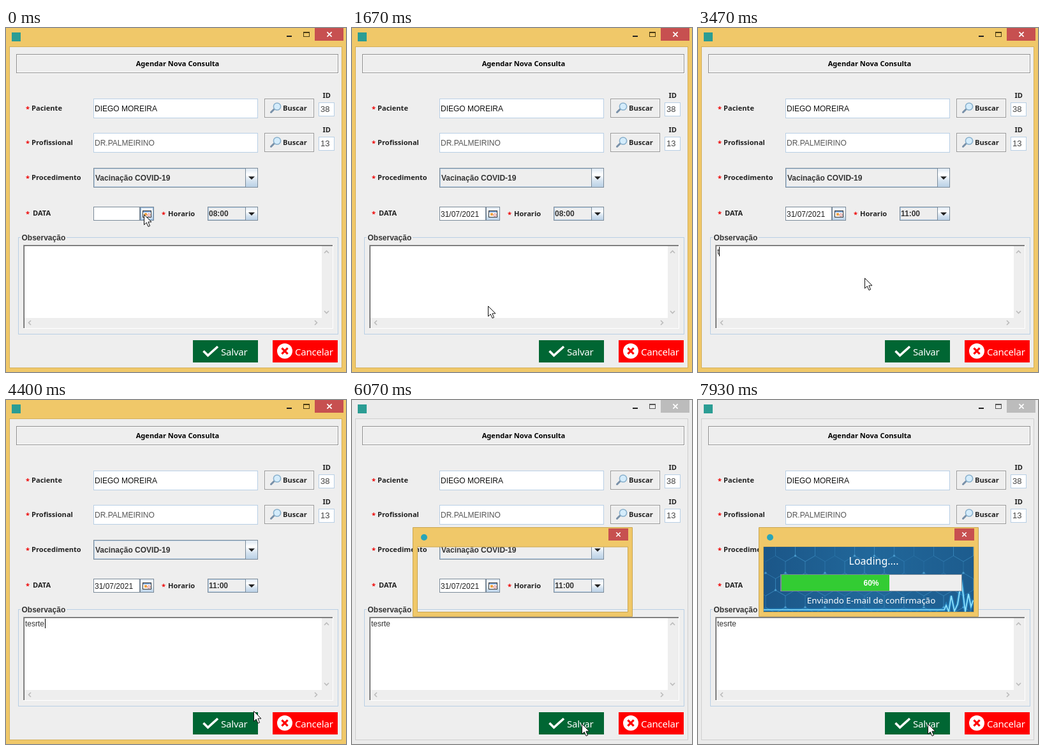
Animation, 533 px wide and 541 px high, one loop 8 s. Source, as an HTML page:

```html
<!DOCTYPE html>
<html lang="pt">
<head>
<meta charset="utf-8">
<style>
html, body { margin: 0; width: 533px; height: 541px; overflow: hidden }
svg { display: block; --frame: #f0c869; --edge: #d3b05c; --close: #c75050; --ink: #4a3b12 }
svg.idle { --frame: #ebebeb; --edge: #cfcfcf; --close: #bcbcbc; --ink: #555 }
text { font: 12px "Liberation Sans", Arial, sans-serif; white-space: pre }
.b { font-weight: bold; fill: #333 }
.l { font: bold 11.1px "Noto Sans", sans-serif; fill: #222 }
.n { font-family: "Noto Sans", sans-serif; fill: #fff }
rect { shape-rendering: crispEdges }
</style>
</head>
<body>
<svg id="stage" width="533" height="541" viewBox="0 0 533 541"></svg>
<script>
const STEEL = '#7a8a99', SKY = '#b8cfe5', PANEL = '#eee';

const fillBox = (x, y, w, h, fill, extra = '') =>
  `<rect x="${x}" y="${y}" width="${w}" height="${h}" fill="${fill}" ${extra}/>`;
const box = (x, y, w, h, fill, stroke) =>
  fillBox(x + .5, y + .5, w - 1, h - 1, fill, `stroke="${stroke}"`);
const line = (d, color, width = 1, extra = '') =>
  `<path d="${d}" fill="none" stroke="${color}" stroke-width="${width}" ${extra}/>`;
const shape = (d, fill) => `<path d="${d}" fill="${fill}"/>`;
const dot = (x, y, r, fill, extra = '') => `<circle cx="${x}" cy="${y}" r="${r}" fill="${fill}" ${extra}/>`;
const text = (x, y, s, cls = '', extra = '') => `<text x="${x}" y="${y}" class="${cls}" ${extra}>${s}</text>`;
const mid = 'text-anchor="middle"';
const group = (id, body) => `<g id="${id}">${body}</g>`;
const cross = (x, y, r, color, width) =>
  line(`M${x - r} ${y - r}l${2 * r} ${2 * r}m0 ${-2 * r}l${-2 * r} ${2 * r}`, color, width);
const label = (x, y, s, star) =>
  text(star, y + 1, '*', 'l', 'style="fill:#e00"') + text(x, y, s, 'l');
const triangle = (x, y, w, dir = 1) => shape(`M${x - w} ${y}h${2 * w}l${-w} ${w * dir}z`, '#222');

const combo = (x, y, w, h) =>
  box(x, y, w, h, PANEL, STEEL) + box(x + 1, y + 1, w - 2, h - 2, 'none', SKY) +
  box(x + w - 20, y, 20, h, 'url(#metal)', STEEL) + triangle(x + w - 10, y + h / 2 - 2, 5);

const search = y =>
  box(405, y, 78, 30, PANEL, '#999') + box(406, y + 1, 76, 28, 'none', '#f8f8f8') +
  line(`M420 ${y + 17}l-4.5 4.5`, '#7890a8', 3, 'stroke-linecap="round"') +
  dot(425, y + 12.5, 5.6, '#d4ecfb', 'stroke="#86aecb" stroke-width="1.5"') +
  text(434, y + 19, 'Buscar', 'l');

const person = (y, name, value, id, ink) =>
  box(137, y, 258, 31, '#fff', SKY) + text(139, y + 20, value, '', `fill="${ink}"`) +
  search(y) + box(490, y + 6, 25, 22, '#fff', SKY) +
  text(493, y + 21, id, '', 'style="font-size:13px" fill="#444"') +
  text(496.5, y - 1, 'ID', 'l') + label(40, y + 19, name, 31);

function windowFrame() {
  return fillBox(0, 0, 533, 541, 'var(--frame)') + box(5, 29, 522, 506, PANEL, 'var(--edge)') +
    fillBox(9, 7, 14, 14, '#2b9d94') +
    fillBox(440, 12, 8, 2, '#222') +
    fillBox(466.5, 7.5, 9, 6, 'none', 'stroke="var(--ink)"') + fillBox(466, 6, 10, 2, 'var(--ink)') +
    fillBox(484, 0, 45, 20, 'var(--close)') + cross(507, 10, 3.6, '#fff', 1.7);
}

function form() {
  return box(17, 42, 505, 30, 'none', '#fff') + box(16, 41, 505, 30, PANEL, '#8e8e8e') +
    box(17, 42, 503, 28, 'none', '#fafafa') +
    text(269, 60, 'Agendar Nova Consulta', 'l', mid + ' style="fill:#000"') +
    person(111, 'Paciente', 'DIEGO MOREIRA', '38', '#111') +
    person(165, 'Profissional', 'DR.PALMEIRINO', '13', '#555') +
    label(40, 239, 'Procedimento', 31) + combo(137, 220, 258, 31) + text(140, 240, 'Vacinação COVID-19', 'b') +
    label(42, 295, 'DATA', 31) + box(137, 281, 73, 22, '#fff', STEEL) + text(139, 297, '', '', 'id="date" fill="#222"') +
    box(210, 281, 22, 22, 'url(#metal)', STEEL) + group('hover', box(211, 282, 20, 20, 'none', '#8fb2d6')) +
    box(214, 287, 14, 11, '#fff', '#333') + fillBox(215, 288, 12, 2, '#7ba6d8') +
    fillBox(217, 291, 4, 4, '#f0a040') + dot(224, 294, 2, '#fff', 'stroke="#c66"') +
    label(254, 296, 'Horario', 244) + combo(316, 281, 79, 22) + text(318, 296, '', 'b', 'id="hour"') +
    box(19, 329, 502, 153, 'none', SKY) + fillBox(23, 324, 72, 12, PANEL) + text(24.5, 334, 'Observação', 'b');
}

function notes() {
  const chevron = d => line(d, '#bbb', 1.6);
  return fillBox(27, 341, 486, 132, '#fff') + fillBox(27, 341, 485, 131, '#9a9a9a') +
    fillBox(28, 342, 484, 130, '#666') + fillBox(29, 343, 483, 129, PANEL) + fillBox(29, 343, 466, 113, '#fff') +
    chevron('M499 354l3.5 -3.5 3.5 3.5') + chevron('M499 445l3.5 3.5 3.5 -3.5') +
    chevron('M39 460l-3.5 3.5 3.5 3.5') + chevron('M484 460l3.5 3.5 -3.5 3.5') +
    text(30, 356, '', '', 'id="note" fill="#333"') + fillBox(0, 344, 1, 15, '#000', 'id="caret"');
}

function actions() {
  const tight = 'style="font-size:15px;letter-spacing:-.2px"';
  return fillBox(293, 491, 102, 35, '#063') + line('M309.5 508l7 7 15.5 -14', '#fff', 3.6) +
    text(337, 515, 'Salvar', 'n', tight) +
    fillBox(418, 491, 102, 35, '#f00') + dot(437, 508, 12, '#fff') + cross(437, 508, 4.6, '#f00', 3.2) +
    text(453, 515, 'Cancelar', 'n', tight);
}

function calendar() {
  const cell = (c, r, s, color) => text(42.5 + c * 25, 361 + r * 21, s, 'b', `${mid} style="fill:${color};font-size:11px"`);
  let out = box(30, 303, 202, 172, PANEL, STEEL) + combo(31, 304, 104, 21) + text(35, 319, 'Julho', 'b') +
    box(135, 304, 17, 21, 'url(#metal)', STEEL) + triangle(143.5, 312, 3, -1) + triangle(143.5, 317, 3) +
    box(153, 304, 78, 21, '#fff', STEEL) + text(185, 319, '2021', 'b') +
    box(215, 304, 16, 21, 'url(#metal)', STEEL) + triangle(223, 312, 3, -1) + triangle(223, 317, 3) +
    fillBox(31, 326, 200, 21, '#d2e4ee') + fillBox(31, 347, 24, 127, '#d2e4ee');
  ['Dom', 'Seg', 'Ter', 'Qua', 'Qui', 'Sex', 'Sáb'].forEach((d, i) => out += cell(i + 1, -1, d, i ? '#005aa4' : '#a40000'));
  for (let r = 0; r < 5; r++) out += cell(0, r, 27 + r, '#666');
  for (let d = 1; d <= 31; d++) out += cell((d + 3) % 7 + 1, Math.floor((d + 3) / 7), d, '#222');
  return out;
}

function hourList() {
  let out = box(316, 303, 79, 146, PANEL, '#111') + fillBox(317, 304, 60, 18, '#a3b8cc', 'id="pick"');
  for (let i = 0; i < 8; i++) out += text(318, 318 + 18 * i, String(8 + i).padStart(2, '0') + ':00', 'b');
  out += box(377, 304, 17, 144, PANEL, SKY) + box(377, 304, 17, 17, PANEL, '#9ab') + box(377, 431, 17, 17, PANEL, '#9ab') +
    triangle(385.5, 315, 4, -1) + triangle(385.5, 437, 4) + box(378, 320, 15, 100, 'url(#thumb)', '#6382bf');
  for (let y = 367; y < 373; y += 2) out += fillBox(381, y, 9, 1, '#6382bf');
  return out;
}

function backdrop() {
  let out = fillBox(102, 231, 331, 103, 'url(#sea)');
  for (let r = 0; r < 5; r++) for (let c = 0; c < 12; c++) {
    const x = 106 + c * 31 + r % 2 * 15.5, y = 236 + r * 27;
    const seed = Math.sin(c * 12.9 + r * 78.2) * 43758, glow = seed - Math.floor(seed);
    out += line(`M${x} ${y - 18}l15.5 9v18l-15.5 9l-15.5 -9v-18z`, '#4ba3d8', 1, `opacity="${(.08 + glow * .3).toFixed(2)}"`);
    if (glow > .6) out += dot(x, y - 18, 1.8, '#5db5e6', 'opacity=".6"');
  }
  const pulse = 'M102 330H386l3 -7 4 10 4 -25 5 24 5 -11 6 -38 6 50 5 -28 4 20 3 -9h4';
  return out + line(pulse, '#29b6ff', 5, 'opacity=".35"') + line(pulse, '#8fe4ff', 1.7);
}

function dialog() {
  const percent = (id, color, extra) => text(271.5, 292, '', 'b', `id="${id}" ${mid} style="fill:${color}" ${extra}`);
  return '<path d="M95.5 200.5h344v140h-344zM102.5 231v102.500h330V231z" fill-rule="evenodd" fill="#f0c869" stroke="#c9a550"/>' +
    dot(113, 216, 5, '#2aa5b8') + fillBox(402, 202, 31, 19, '#c75050') + cross(417.500, 211.5, 3.2, '#fff', 1.6) +
    group('loading', `<g clip-path="url(#inside)">${backdrop()}</g>` +
      text(275.5, 259, 'Loading....', 'n', mid + ' style="font-size:16px"') +
      text(271.5, 320, 'Enviando E-mail de confirmação', 'n', mid + ' style="font-size:13.4px;font-weight:500"') +
      box(129, 274, 285, 27, PANEL, STEEL) + fillBox(130, 275, 1, 25, STEEL) +
      percent('under', '#6382bf', '') + fillBox(131, 275, 0, 25, '#3c3', 'id="bar"') +
      percent('over', '#fff', 'clip-path="url(#done)"'));
}

const gradient = (id, dir, ...colors) => `<linearGradient id="${id}" x2="${dir}" y2="${1 - dir}">` +
  colors.map((c, i) => `<stop offset="${i / (colors.length - 1)}" stop-color="${c}"/>`).join('') + '</linearGradient>';

const $ = id => document.getElementById(id);
const stage = $('stage');
stage.innerHTML = '<defs>' + gradient('metal', 0, '#dde8f3', '#fff', '#d5e3f0', SKY) +
  gradient('thumb', 1, '#dde8f3', '#fff', SKY) + gradient('sea', 1, '#1b5688', '#21679a', '#1d5c8e') +
  `<clipPath id="inside">${fillBox(103, 231, 329, 102, '#fff')}</clipPath>` +
  `<clipPath id="done">${fillBox(131, 275, 0, 25, '#fff', 'id="doneBox"')}</clipPath></defs>` +
  windowFrame() + form() + notes() + actions() + group('calendar', calendar()) + group('hours', hourList()) +
  group('dialog', dialog()) +
  '<path id="cursor" d="M.5 .5V16.500L4.200 13 7 19.300 9.600 18.200 6.900 12H12z" fill="#fff" stroke="#111"/>';

// Pointer path: time, x, y
const path = [
  [0, 216, 293], [950, 216, 293], [1530, 213, 437], [1670, 213, 437], [1800, 216, 428],
  [2260, 384, 296], [2330, 384, 296], [2600, 340, 363], [2860, 340, 363], [3130, 262, 390],
  [3400, 262, 390], [3600, 258, 400], [4130, 258, 400], [4400, 388, 489], [4530, 403, 494],
  [4670, 403, 494], [4870, 445, 513], [5270, 445, 513], [5600, 360, 509], [8000, 360, 509]
];
const keys = [3460, 3790, 3860, 3990, 4060, 4190];

function pointer(t) {
  const i = path.findIndex(p => p[0] > t), [t0, x0, y0] = path[i - 1], [t1, x1, y1] = path[i];
  const k = (t - t0) / (t1 - t0);
  return [Math.round(x0 + (x1 - x0) * k), Math.round(y0 + (y1 - y0) * k)];
}

function draw(ms) {
  const step = Math.floor((ms + 4) * 15 / 1000), t = Math.min(step * 1000 / 15, 7990);
  const show = (id, on) => $(id).style.display = on ? '' : 'none';
  const [x, y] = pointer(t);
  $('cursor').setAttribute('transform', `translate(${x} ${y})`);
  stage.classList.toggle('idle', t >= 6060);

  show('hover', t < 1060);
  show('calendar', t >= 530 && t < 1590);
  $('date').textContent = t >= 1590 ? '31/07/2021' : '';
  show('hours', t >= 2320 && t < 2860);
  $('pick').setAttribute('y', 304 + 18 * Math.max(0, Math.min(7, Math.floor((y - 304) / 18))));
  $('hour').textContent = t >= 2860 ? '11:00' : '08:00';

  const typed = keys.filter(k => t >= k).length;
  $('note').textContent = 'tesrte'.slice(0, typed);
  $('caret').setAttribute('x', [30, 33, 40, 46, 50, 54, 61][typed]);
  show('caret', t >= 3130 && t < 4790 || t >= 5330 && t < 5590);

  show('dialog', t >= 6060);
  show('loading', t >= 6130);
  const done = Math.max(0, Math.floor(28.6 + (step - 105) * 2.27));
  for (const id of ['bar', 'doneBox']) $(id).setAttribute('width', Math.round(2.81 * done));
  $('under').textContent = $('over').textContent = done + '%';
}

const start = performance.now();
function tick() {
  draw((performance.now() - start) % 8000);
  requestAnimationFrame(tick);
}
tick();
</script>
</body>
</html>
```
